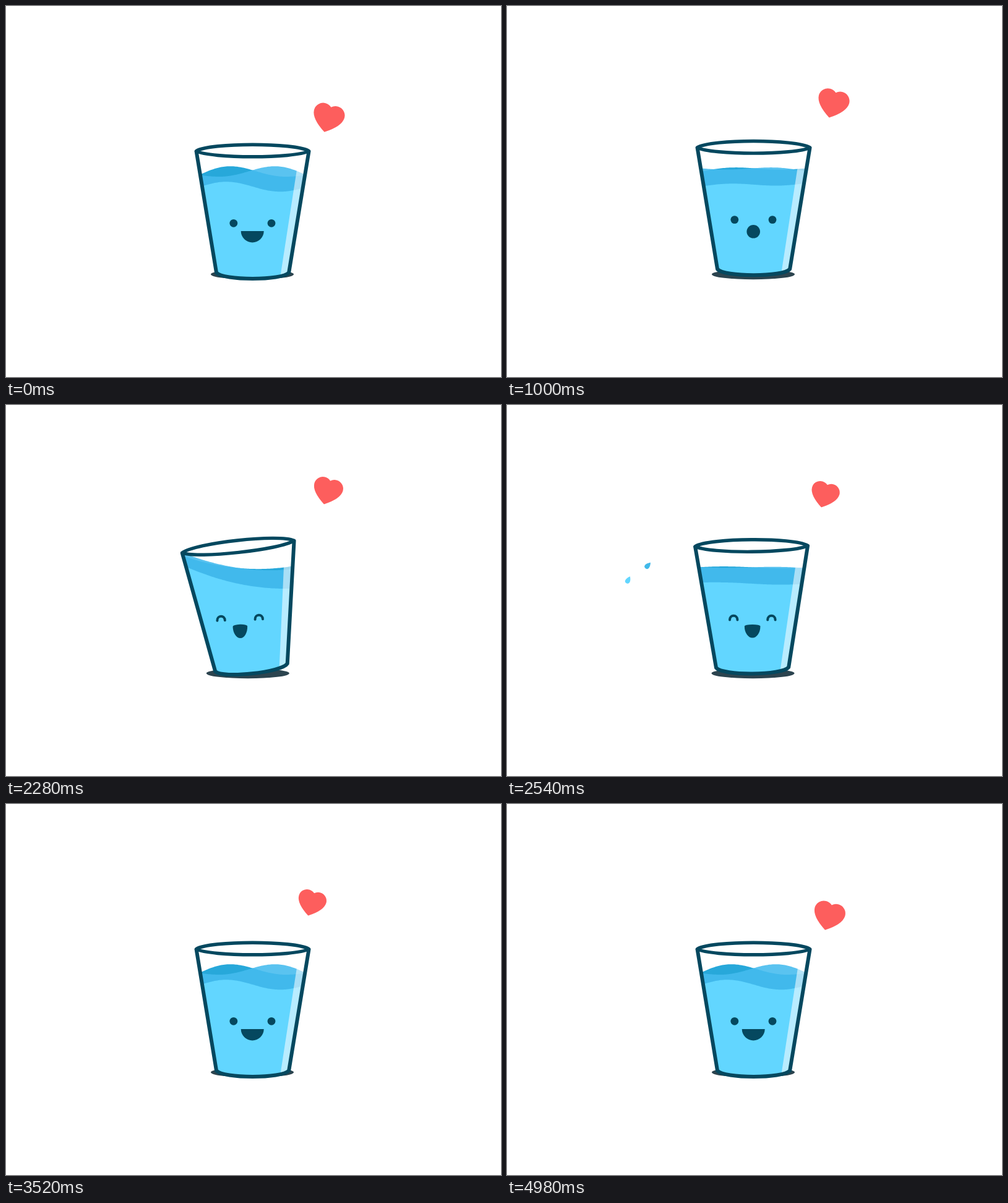
These frames come from a looping animation (800x600 px, 5000 ms). An HTML page with a canvas:

```html
<!DOCTYPE html>
<html lang="en">
<head>
<meta charset="utf-8">
<title>Happy glass of water</title>
<style>
  html, body { margin: 0; width: 100%; height: 100%; overflow: hidden; background: #fff; }
  canvas { display: block; }
</style>
</head>
<body>
<canvas id="stage" width="800" height="600"></canvas>
<script>
const ctx = document.getElementById('stage').getContext('2d');
const LOOP = 5000, TAU = Math.PI * 2, CX = 398.5, FLOOR = 432;
const INK = '#05485f', WATER = '#62d6ff', DROP = '#41b9e9';

const clamp = v => Math.max(0, Math.min(1, v));
const mix = (a, b, k) => a.map((v, i) => v + (b[i] - v) * k);
const ramp = (t, from, to) => {
  const k = clamp((t - from) / (to - from));
  return k * k * (3 - 2 * k);
};
// Rises from a to b, holds, falls from c to d
const pulse = (t, a, b, c, d) => ramp(t, a, b) * (1 - ramp(t, c, d));

// One damped sway to the left and back over to the right
const SWAY = 2170, SWAY_TIME = 760;
function sway(t, amp, damping) {
  const u = t - SWAY;
  if (u < 0 || u > SWAY_TIME) return 0;
  return -amp * Math.exp(-damping * u / 1000) * Math.sin(TAU * u / SWAY_TIME);
}

const airborne = t => pulse(t, 420, 760, 760, 1350);
const laughing = t => pulse(t, 2130, 2280, 2280, 3360);

// Water layers from back to front; dir is the way the wave faces
const LAYERS = [
  { color: '#27a8da', base: 265.5, dir: 1, bow: 8 },
  { color: 'rgba(69,188,238,.885)', base: 265.5, dir: -1, bow: 8 },
  { color: WATER, base: 292, dir: 1, bow: 1 }
];

function fillWater(t, deg, layer, depth) {
  const air = airborne(t);
  const calm = 1 - air - laughing(t);
  const level = layer.base + 4 * (1 - calm);
  const tilt = -deg * (2.7 + .8 * depth) - layer.dir * 4.5 * air;
  const bow = layer.bow * calm - 1.8 * Math.abs(deg);
  ctx.beginPath();
  ctx.moveTo(CX - 95, 450);
  for (let x = -95; x <= 95; x += 2) {
    const s = x / 86.5;
    ctx.lineTo(CX + x, level + tilt * s + bow * s * s + 8 * layer.dir * calm * Math.sin(Math.PI * s));
  }
  ctx.lineTo(CX + 95, 450);
  ctx.fillStyle = layer.color;
  ctx.fill();
}

function wallPath() {
  ctx.beginPath();
  ctx.moveTo(307.7, 235.5);
  ctx.lineTo(340, 431);
  ctx.bezierCurveTo(350, 444.2, 447, 444.2, 457.2, 431);
  ctx.lineTo(489.4, 235.5);
}

function drawGlass(t, deg) {
  ctx.save();
  wallPath();
  ctx.clip();
  LAYERS.forEach((layer, i) => fillWater(t, deg, layer, i));
  ctx.beginPath();
  ctx.moveTo(474.6, 235);
  ctx.lineTo(500, 235);
  ctx.lineTo(470, 446);
  ctx.lineTo(442, 446);
  ctx.fillStyle = 'rgba(255,255,255,.55)';
  ctx.fill();
  ctx.restore();

  ctx.strokeStyle = INK;
  ctx.lineJoin = ctx.lineCap = 'round';
  ctx.lineWidth = 6;
  wallPath();
  ctx.stroke();
  ctx.lineWidth = 5.4;
  ctx.beginPath();
  ctx.moveTo(307.5, 234.5);
  ctx.bezierCurveTo(330, 220.8, 467, 220.8, 489.5, 234.5);
  ctx.bezierCurveTo(467, 246.9, 330, 246.9, 307.5, 234.5);
  ctx.closePath();
  ctx.stroke();
}

const BLINKS = [1405, 2110, 3130, 4230];
const eyeOpen = t => Math.min(...BLINKS.map(b => 1 - .9 * pulse(t, b, b + 100, b + 110, b + 210)));

function drawEye(x, t) {
  ctx.beginPath();
  if (t > BLINKS[1] + 105 && t < BLINKS[2] + 105) {
    ctx.moveTo(x - 6.2, 355.5);
    ctx.bezierCurveTo(x - 6.2, 346.5, x + 6.2, 346.5, x + 6.2, 355.5);
    ctx.strokeStyle = INK;
    ctx.lineWidth = 4;
    ctx.lineCap = 'round';
    ctx.stroke();
  } else {
    ctx.ellipse(x, 351.3, 6.4, 6.4 * eyeOpen(t), 0, 0, TAU);
    ctx.fill();
  }
}

// Mouth: half width, corner y, top y, bottom y
const SMILE = [18.5, 364, 364, 382.4];
const OH = [10.8, 370.5, 359.7, 381.3];
const LAUGH = [11.8, 366, 362.8, 385];

function drawMouth(t) {
  const happy = mix(SMILE, LAUGH, laughing(t));
  const [w, corner, top, bottom] = mix(happy, OH, pulse(t, 350, 560, 2140, 2280));
  ctx.beginPath();
  ctx.ellipse(CX - .3, corner, w, bottom - corner, 0, 0, Math.PI);
  ctx.ellipse(CX - .3, corner, w, corner - top, 0, Math.PI, TAU);
  ctx.fill();
}

function drawFace(t, angle) {
  ctx.save();
  ctx.translate(CX + sway(t, 27.2, .66), 360);
  ctx.rotate(angle * .3);
  ctx.translate(-CX, -360);
  ctx.fillStyle = INK;
  drawEye(367.8, t);
  drawEye(429, t);
  drawMouth(t);
  ctx.restore();
}

// Corners of the heart's drifting path: time, x, y
const DRIFT = [[0, 522, 180], [760, 527, 160.5], [1460, 530, 149], [2280, 521, 138],
               [2820, 508, 150.5], [3520, 495, 159], [4340, 502, 174], [LOOP, 522, 180]];

function drawHeart(t) {
  const i = DRIFT.findIndex(p => p[0] > t);
  const a = DRIFT[i - 1], b = DRIFT[i];
  const [, x, y] = mix(a, b, (t - a[0]) / (b[0] - a[0]));
  const size = .95 + .05 * Math.cos(TAU * t / 1000);
  ctx.save();
  ctx.translate(x, y);
  ctx.rotate(Math.PI / 12);
  ctx.scale(size, size);
  ctx.translate(-1, 0);
  ctx.beginPath();
  ctx.moveTo(0, 25);
  ctx.quadraticCurveTo(-25, 9, -25.4, -5.4);
  ctx.arc(-10.2, -5.4, 15.2, Math.PI, Math.PI * 1.735);
  ctx.arc(10.2, -5.4, 15.2, Math.PI * 1.265, TAU);
  ctx.quadraticCurveTo(25, 9, 0, 25);
  ctx.fillStyle = '#fd5e5d';
  ctx.fill();
  ctx.restore();
}

function drawDrop(p, vx, up, fall, color) {
  if (p <= 0 || p >= 1) return;
  const size = Math.min(1, p / .3, (1 - p) / .16);
  ctx.save();
  ctx.translate(499.3, 254.3);
  ctx.translate(vx * p, fall * p * p - up * p);
  ctx.rotate(Math.atan2(2 * fall * p - up, vx));
  ctx.scale(size, size);
  ctx.beginPath();
  ctx.moveTo(-9.6, 0);
  ctx.quadraticCurveTo(-3, -5.2, 1.8, -5.2);
  ctx.arc(1.8, 0, 5.2, -Math.PI / 2, Math.PI / 2);
  ctx.quadraticCurveTo(-3, 5.2, -9.6, 0);
  ctx.fillStyle = color;
  ctx.fill();
  ctx.restore();
}

function splash(t, start) {
  const p = (t - start) / 240;
  drawDrop(p, 70, 65, 81.5, DROP);
  drawDrop(p, 106, 132, 188, WATER);
}

function draw(t) {
  ctx.fillStyle = '#fff';
  ctx.fillRect(0, 0, 800, 600);

  const deg = sway(t, 8.93, 1.17);
  const angle = deg * Math.PI / 180;
  const jump = -17.1 * Math.sin(Math.PI * clamp((t - 430) / 640));
  const hop = pulse(t, SWAY, 2280, 2820, 3080);

  ctx.fillStyle = '#2c444f';
  ctx.beginPath();
  ctx.ellipse(398 + deg * 1.15, 434, 67, 8.2, 0, 0, TAU);
  ctx.fill();

  ctx.save();
  ctx.translate(CX - 2 * hop, FLOOR + jump - 6.5 * hop);
  ctx.rotate(angle);
  ctx.translate(-CX, -FLOOR);
  drawGlass(t, deg);
  ctx.restore();

  ctx.save();
  ctx.translate(0, jump - 8 * hop);
  drawFace(t, angle);
  ctx.restore();

  splash(t, 2620);
  ctx.save();
  ctx.translate(2 * CX - 9, 0);
  ctx.scale(-1, 1);
  splash(t, 2330);
  ctx.restore();

  drawHeart(t);
}

const start = performance.now();
function tick() {
  draw(Math.max(0, performance.now() - start) % LOOP);
  requestAnimationFrame(tick);
}
tick();
</script>
</body>
</html>
```
